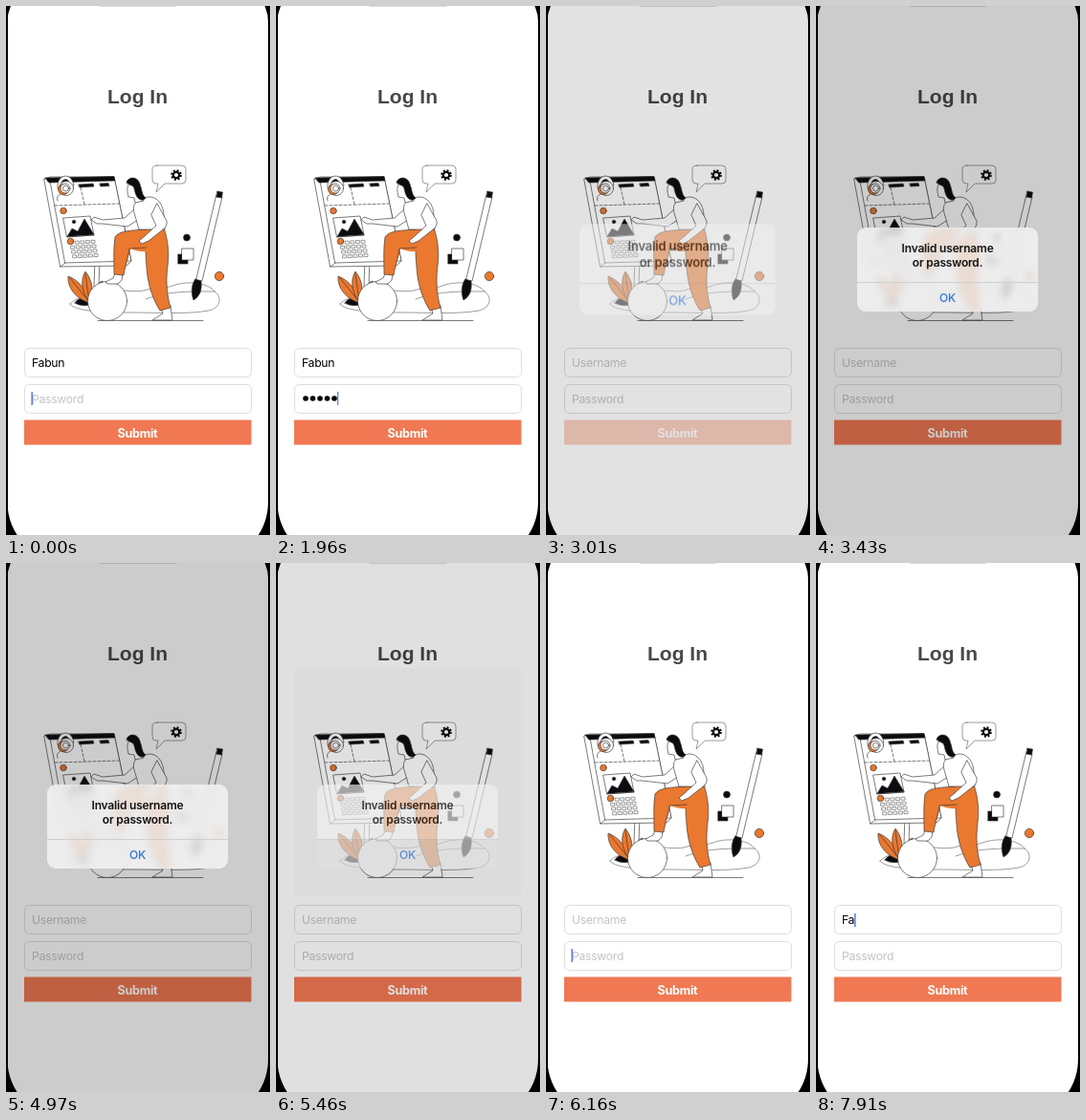
An HTML page that plays this animation: 276 by 554 pixels, repeating every 8000 ms.

```html
<!DOCTYPE html>
<html lang="en">
<head>
<meta charset="utf-8">
<title>Log In</title>
<style>
  html, body { margin: 0; width: 100%; height: 100%; overflow: hidden; background: #000; }
  #stage { position: relative; width: 276px; height: 554px; overflow: hidden; contain: strict; }
  #screen { position: absolute; left: 1.5px; top: 0; width: 272.5px; height: 554px; overflow: hidden; background: #fff;
    clip-path: inset(-22px 0 -28px round 38px 38px 62px 62px); }
  #content { position: absolute; left: -1.5px; top: 0; width: 276px; height: 554px; }
  svg { position: absolute; left: 0; top: 0; }
  text { font: 12.2px Inter, sans-serif; letter-spacing: -.28px; }
  .field { fill: #fff; stroke: #dedede; }
  .hint { fill: #c4c4c6; }
  .art { stroke: #333; stroke-width: .65; fill: #fff; stroke-linejoin: round; stroke-linecap: round; }
  .art .k { fill: #0c0c10; }
  .art .o { fill: #ea782e; }
  .art .n { fill: none; }
  .art .g { stroke: #666; }
  #dim { position: absolute; inset: 0; background: #000; }
  #alert { position: absolute; left: 43px; top: 232px; width: 189px; height: 88px; border-radius: 9px; overflow: hidden;
    background: rgba(243, 243, 243, .86); text-align: center; color: #111;
    font: 600 12px/15px Inter, sans-serif; letter-spacing: -.2px; }
  #alert p { margin: 14px 0 13px; }
  #ok { height: 31px; line-height: 32px; border-top: 1px solid #cfcfcf; color: #2f72de; font-weight: 500; }
</style>
</head>
<body>
<div id="stage"><div id="screen"><div id="content">
<svg width="276" height="554" viewBox="0 0 276 554">
  <rect x="97" y="-4" width="82" height="4.600" rx="2" fill="#bbb"/>
  <text x="137.5" y="102" text-anchor="middle" fill="#48484a" style="font:bold 21px 'Liberation Sans',Arial,sans-serif;letter-spacing:0">Log In</text>
  <rect id="tile" x="19" y="110" width="237" height="238" opacity="0"/>

  <g class="art">
    <!-- ground -->
    <path class="g" d="M67 312C73 304 86 306 96 301C112 293 128 301 144 298C156 294 164 297 174 293C190 287 212 290 218 299C226 304 225 316 212 319C190 323 160 321 130 321C104 321 72 320 67 312Z"/>
    <path class="g n" d="M146 307C168 298 196 299 218 299"/>
    <path d="M96 329.5H206"/>
    <path class="k" d="M72 311Q77 303 84 309L88 313Q78 315 72 311Z"/>
    <g class="o">
      <path d="M88 311C73 307 64 295 65 283C76 287 85 298 88 311Z"/>
      <path d="M87 310C78 298 78 286 83 278C91 288 92 300 87 310Z"/>
      <path d="M88 310C89 297 95 290 101 288C103 299 98 307 88 310Z"/>
      <path class="n" d="M67 285L87 310L83 280M99 290L88 310"/>
    </g>
    <!-- board -->
    <path d="M93 262L92 294H97L98 262Z"/>
    <path d="M40 181L46 179H113L131 267L126 272L57 273Z"/>
    <path d="M46 181L113 179L131 267L62 269Z"/>
    <path class="n" d="M62 269L57 273"/>
    <path class="k" d="M41 180L113 178.500L114 183L45 185Z"/>
    <path class="k" d="M76 187L91 186L92 189L77 190ZM98 186L107 185.600L108 188.500L99 189Z"/>
    <path class="n" stroke-dasharray="3 2" d="M51 209L118 207M78 190L82 208"/>
    <path d="M54 191C52 177 68 172 71 188L68 190C66 177 56 180 57 192Z"/>
    <circle cx="63" cy="191" r="7.500"/>
    <circle class="o" cx="60" cy="192" r="5.500"/>
    <circle cx="62" cy="191" r="5"/>
    <circle cx="62.500" cy="191" r="3"/>
    <path class="n" d="M57 197Q52 199 54 204"/>
    <circle class="o" cx="60" cy="214.500" r="3.300"/>
    <path d="M60 222L88 220L92 240L64 242Z"/>
    <path class="k" d="M64 241.500L69 233L75 236L82 223L92 239.500Z"/>
    <circle class="k" cx="71" cy="226" r="1.800"/>
    <g id="days" class="g"></g>
    <circle class="o" cx="67.500" cy="246.500" r="3.300"/>
    <circle cx="106" cy="309" r="20.500"/>
    <!-- woman -->
    <path d="M136 211L124 222L101 224L92 221L89 224L95 228L101 228L127 231L141 222Z"/>
    <path d="M162 316L164 322L153 329H174L172 314Z"/>
    <path d="M114 280L112 285L104 289L106 291H117L121 287L122 280Z"/>
    <path class="o" d="M148 234L165 232C169 244 171 258 169 272C167 288 168 302 172 316L161 319C154 308 148 292 147 274C146 262 145 252 148 246Z"/>
    <path class="o" d="M160 234L146 234C132 235 118 235 114 242C112 254 113 268 113 281L123 282C125 270 129 262 130 254C142 259 157 259 163 249Z" stroke="none"/>
    <path class="n" d="M146 234C132 235 118 235 114 242C112 254 113 268 113 281L123 282C125 270 128 262 129 254L147 253"/>
    <path d="M139 203C133 206 132 212 135 220L139 234H166L165 220C165 208 158 199 149 200Z"/>
    <path d="M158 207L168 225Q169 231 163 235L149 246L142 249L139 246L145 241L157 230L152 219Z"/>
    <path d="M128 187C126 191 127 195 128 200L134 201L135 206L144 204L141 190Z"/>
    <path class="k" d="M126 185C127 179 136 178 139 184C142 190 141 197 146 201C144 204 140 204 137 200C134 195 135 192 133 189Z"/>
    <!-- speech bubble -->
    <path class="g" d="M158 167H184Q188 167 188 171V182Q188 186 184 186H166L157 195L159 186H157Q153 186 153 182V171Q153 167 158 167Z"/>
    <circle class="n" cx="178" cy="177" r="4.700" stroke="#0c0c10" stroke-width="2.200" stroke-dasharray="1.900 1.790" stroke-linecap="butt"/>
    <circle class="n" cx="178" cy="177" r="3.200" stroke="#0c0c10" stroke-width="2.200"/>
    <!-- brush and shapes -->
    <path d="M220 199L226 200L205 288L199 287Z"/>
    <path class="k" d="M221 194L226.500 195L225.500 201L220 200Z"/>
    <path class="k" d="M198 286L204 288C205 297 203 304 196 308C193 300 194 291 198 286Z"/>
    <circle class="k" cx="189" cy="242.500" r="3.500"/>
    <path class="k" d="M180 260H190V270H180Z"/>
    <path d="M184 254H196V266H184Z"/>
    <circle class="o" cx="223" cy="283" r="4.700"/>
  </g>

  <rect class="field" x="19.500" y="358.500" width="237" height="30" rx="5"/>
  <rect class="field" x="19.500" y="396.500" width="237" height="30" rx="5"/>
  <text id="user" x="27" y="378"></text>
  <text id="hint" class="hint" x="27" y="415.500">Password</text>
  <g id="dots"></g>
  <rect id="caret" width="1.300" height="14" fill="#4468c8"/>
  <g id="submit">
    <rect x="19" y="433.500" width="237.500" height="26" fill="#f07852"/>
    <text x="137.500" y="451.500" text-anchor="middle" fill="#fff" style="font-size:12.6px;font-weight:700">Submit</text>
  </g>
</svg>
<div id="dim"></div>
<div id="alert"><p>Invalid username<br>or password.</p><div id="ok">OK</div></div>
</div></div></div>

<script>
const LOOP = 8000, OPEN = 2870, CLOSE = 5390;
const NAME = 'Fabun';
const KEYS = [560, 770, 980, 1120, 1400];
const $ = id => document.getElementById(id);
const [user, hint, dots, caret, submit, dim, box, ok, tile] =
  ['user', 'hint', 'dots', 'caret', 'submit', 'dim', 'alert', 'ok', 'tile'].map($);
const spring = x => x <= 0 ? 0 : 1 - (1 + x) * Math.exp(-x);
const ease = x => x * x * (3 - 2 * x);

function add(parent, tag, attrs) {
  const el = document.createElementNS('http://www.w3.org/2000/svg', tag);
  for (const k in attrs) el.setAttribute(k, attrs[k]);
  parent.append(el);
  return el;
}

for (let i = 1; i < 20; i++) {
  const col = i % 5, row = Math.floor(i / 5);
  add($('days'), 'rect', { x: 67 + col * 5.6 + row, y: 246.5 + row * 4.8 - col * .3, width: 3.6, height: 2.9 });
}
const bullets = KEYS.map((_, i) => add(dots, 'circle', { cx: 31 + 7.5 * i, cy: 411, r: 2.8 }));

function render(t) {
  const ramp = (a, b) => Math.min(1, Math.max(0, (t - a) / (b - a)));

  // fields
  const name = t < OPEN ? NAME : t < 7560 ? '' : NAME.slice(0, t < 7910 ? 1 : 2);
  user.textContent = name || 'Username';
  user.setAttribute('class', name ? '' : 'hint');
  const typed = t < OPEN ? KEYS.filter(k => t >= k).length : 0;
  hint.style.opacity = typed ? 0 : 1;
  bullets.forEach((b, i) => b.style.opacity = i < typed ? 1 : 0);

  // caret
  const inUser = t >= 6540;
  let glow = 1;
  if (t < KEYS[0]) glow = 1 - ramp(460, 600);
  else if (t < OPEN) glow = 1 - ramp(1930, 2100) + ramp(2350, 2520);
  else if (!inUser) glow = ramp(5600, 5740);
  else if (t < 7560) glow = ramp(6510, 6650) - ramp(7180, 7350);
  caret.setAttribute('x', inUser && name ? 27 + user.getComputedTextLength() : 26.5 + 7.5 * typed);
  caret.setAttribute('y', inUser ? 367 : 404);
  caret.style.opacity = glow;

  // button press
  submit.style.opacity = 1 - .8 * ease(ramp(2710, 2840)) + .8 * ease(ramp(2940, 3190));

  // alert
  const closing = t >= CLOSE;
  const shown = closing ? 1 - spring((t - CLOSE) * .0192) : spring((t - OPEN) * .0136);
  dim.style.opacity = .2 * shown;
  box.style.opacity = closing ? Math.sqrt(shown) : shown;
  box.style.visibility = shown > .002 ? 'visible' : 'hidden';
  box.style.backdropFilter = `blur(${4 * shown ** 4}px)`;
  box.style.transform = `scale(${closing ? 1 : 1.2 - .2 * shown})`;
  ok.style.background = t >= 5180 ? 'rgba(0,0,0,.07)' : 'none';
  tile.style.opacity = closing ? .03 * ramp(5390, 5500) * (1 - ramp(5560, 5800)) : 0;
}

const start = performance.now();
function tick() {
  render((performance.now() - start) % LOOP);
  requestAnimationFrame(tick);
}
tick();
</script>
</body>
</html>
```
